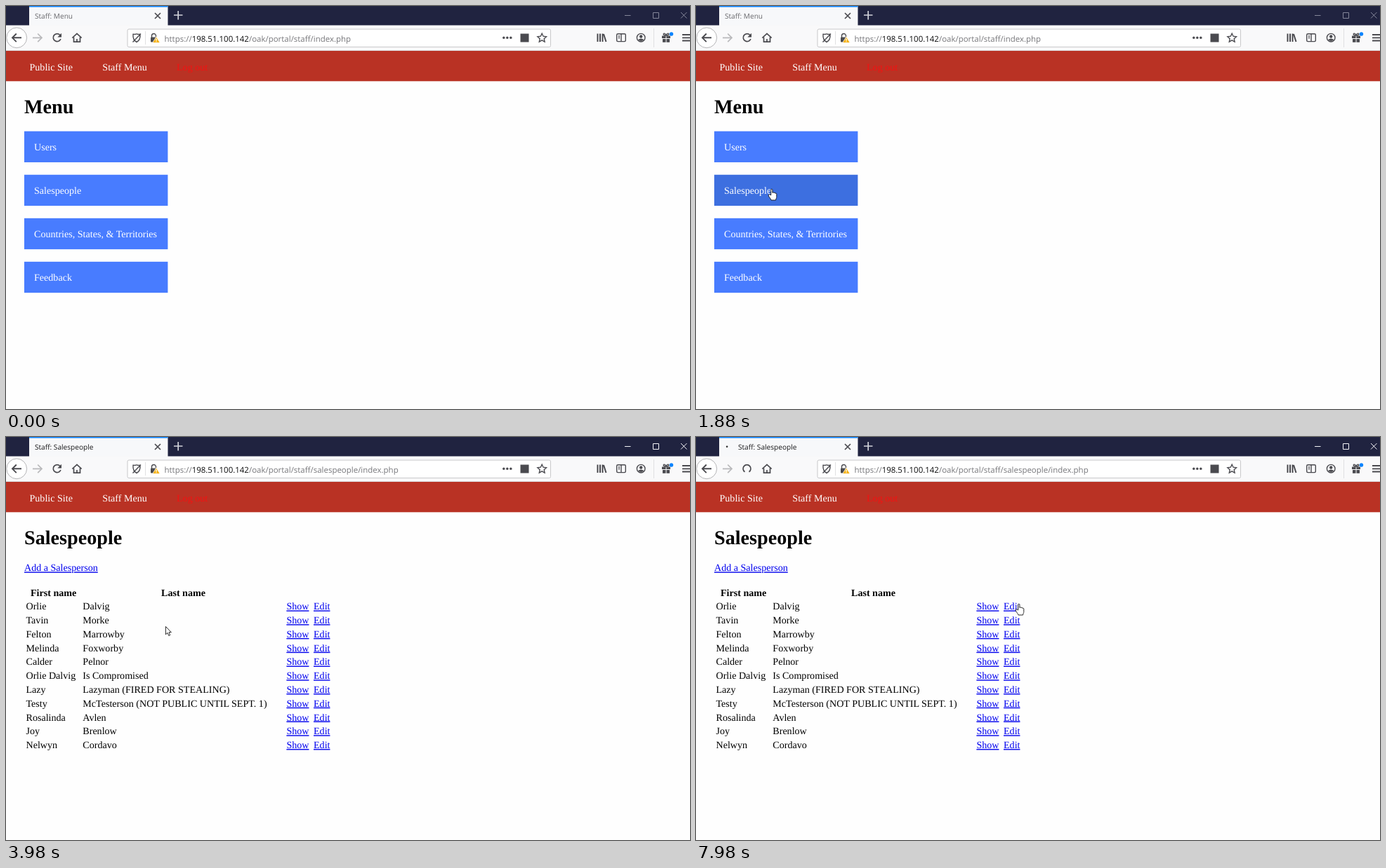
Animation, 974 px wide and 575 px high, one loop 8000 ms. Source, as an HTML page:

```html
<!DOCTYPE html>
<html lang="en">
<head>
<meta charset="utf-8">
<title>Staff</title>
<style>
  html, body { margin: 0; width: 100%; height: 100%; overflow: hidden; background: #fefefe; }
  svg { display: block; width: 974px; height: 575px; }
  text { text-rendering: geometricPrecision; white-space: pre; }
  .ui { font-family: "Open Sans", "Noto Sans", sans-serif; }
  .page { font: 14.08px "Liberation Serif", "Times New Roman", serif; }
  .h1 { font-size: 28.16px; }
  .bold { font-weight: bold; }
  .link { fill: #00e; text-decoration: underline; }
  .icon { fill: none; stroke: #4a4a4f; stroke-width: 1.7; }
  .solid { fill: #4a4a4f; stroke: none; }
</style>
</head>
<body>
<svg id="stage" viewBox="0 0 974 575">
  <rect width="974" height="575" fill="#fefefe"/>

  <!-- window frame and tab -->
  <rect width="974" height="28" fill="#202340"/>
  <rect x="33" width="197.500" height="28" fill="#f7f8fa"/>
  <rect x="33" width="197.500" height="1.500" fill="#0a84ff"/>
  <text id="title" class="ui" y="17.700" font-size="10.100"></text>
  <rect id="throbber" height="2.400" rx="1.200" fill="#333"/>
  <path class="icon" stroke-width="1.400" d="M212 10l8 8m0-8l-8 8"/>
  <path fill="none" stroke="#d2d3da" stroke-width="1.700" d="M239 13h12.500M245.200 7v12.500"/>
  <path id="controls" fill="none" d="M881 13.500h8.500M921.500 9.500h8v8h-8zM961 9l8.500 8.500m0-8.500l-8.500 8.500"/>

  <!-- toolbar -->
  <rect y="27.500" width="974" height="36.500" fill="#f9f9fa"/>
  <path stroke="#d8d8da" d="M0 63.500H974"/>
  <circle cx="15.200" cy="45.300" r="14.400" fill="#fff" stroke="#b4b4b6"/>
  <g class="icon">
    <path stroke-width="1.900" d="M9.500 45.300H22M14.800 39.500L9 45.300l5.800 5.800"/>
    <path stroke="#b9b9bb" style="stroke:#b9b9bb" d="M38 45.300H50.500M45.200 39.500L51 45.300l-5.800 5.800"/>
    <g id="reload"><path d="M76.800 41.300A5.500 5.500 0 1 0 77.900 47"/><path class="solid" d="M79 38.800v5.700h-5.700z"/></g>
    <path id="spin" d="M69.500 49.800A5.500 5.500 0 1 1 75.500 49.800"/>
    <path id="slash" d="M67 40l10.500 10.500"/>
    <path id="stop" d="M67.500 40.500l10 10m0-10l-10 10"/>
    <path d="M94.300 45.500l6.700-6.200 6.700 6.200M96.500 44.500v6.700h9v-6.700M101 51v-4"/>
  </g>
  <rect x="173" y="33" width="602.500" height="25.500" rx="2" fill="#fff" stroke="#c8c8ca"/>
  <path stroke="#e0e0e2" d="M198.500 36v19M922.500 32v27"/>
  <g class="icon" style="stroke-width:1.400">
    <path d="M181 40.300q5 .5 5-1 0 1.500 5 1c.5 6-1.500 9.500-5 11.200-3.500-1.700-5.500-5.200-5-11.200zM180.500 51.500L192 39.500"/>
    <path d="M207.500 45v-2.500a3 3 0 0 1 6 0V45"/>
    <rect class="solid" x="206" y="44.500" width="8" height="7" rx="1"/>
    <path fill="#ffbf00" style="fill:#f5b010;stroke:#fff;stroke-width:.8" d="M214 43.800l5.300 8.700h-10.600z"/>
    <path stroke="#fff" style="stroke:#fff" d="M214 46.500v3m0 .8v1"/>
    <path d="M763.200 39.200l1.900 4 4.400.5-3.300 3 .9 4.400-3.900-2.200-3.900 2.200.9-4.400-3.300-3 4.400-.5z"/>
    <path stroke-width="2" d="M842.500 39.500v11.500M846 39.500v11.500M849.500 39.500v11.500M851 40l3.500 11"/>
    <rect x="869.700" y="39.800" width="12.600" height="10.800" rx="1.500"/>
    <path d="M876 40v10.500M872 43h2m-2 2.500h2"/>
    <circle cx="904.200" cy="45.200" r="5.800"/>
    <circle class="solid" cx="904.200" cy="43.500" r="2.200"/>
    <path class="solid" d="M900 48q4.200-3 8.400 0-4.200 4-8.400 0z"/>
    <path class="solid" d="M934 42.500h5.500v3.500H934zm6.500 0h5.500v3.500h-5.500zM935 47h4.500v4.800H935zm5.500 0h4.500v4.800h-4.500z"/>
    <path d="M940 42q-5-.5-3.500-2.700 2-1 3.500 2.700 1.500-3.700 3.500-2.700Q945 41.500 940 42"/>
    <path style="stroke-width:1.800" d="M963 41h11m-11 4.300h11M963 49.500h11"/>
  </g>
  <circle cx="947.500" cy="40" r="2.700" fill="#0a84ff"/>
  <g fill="#4a4a4f">
    <circle cx="708.800" cy="45.300" r="1.700"/><circle cx="713.800" cy="45.300" r="1.700"/><circle cx="718.800" cy="45.300" r="1.700"/>
    <rect x="732.500" y="39.500" width="12" height="12"/>
  </g>
  <text class="ui" x="225.500" y="50.500" font-size="11.480" fill="#77777b">https://<tspan fill="#0c0c0d">198.51.100.142</tspan>/oak/portal/staff/<tspan id="path"></tspan></text>

  <!-- page -->
  <rect y="64" width="974" height="43.300" fill="#b93224"/>
  <g id="nav" class="page" fill="#fff"></g>
  <g id="menu" class="page"></g>
  <g id="list" class="page"></g>

  <circle id="click" r="10" fill="#ff0" fill-opacity=".47"/>
  <g id="pointer" fill="#fff" stroke="#111" stroke-width=".9" stroke-linejoin="round">
    <path id="arrow" d="M.4.4V11.800L3 9.400 4.800 13.500 6.700 12.700 5 8.700H8.300z"/>
    <path id="hand" d="M-1.300 9V1.300C-1.300-.1.900-.1.900 1.300V5.500C1.200 4.400 3 4.700 3 5.800 3.500 5 5 5.200 5 6.500 5.500 5.800 6.800 6.200 6.800 7.300V11.500C6.800 13 5.700 14 5.500 16H-1C-1.300 14-3.500 12.500-4.600 10-5.400 8.300-3.700 7.200-2.600 8.200z"/>
  </g>
</svg>
<script>
const $ = id => document.getElementById(id);

function add(parent, tag, attrs, content = '') {
  const node = document.createElementNS('http://www.w3.org/2000/svg', tag);
  for (const key in attrs) node.setAttribute(key, attrs[key]);
  node.textContent = content;
  return $(parent).appendChild(node);
}
const write = (parent, x, y, content, cls = '') => add(parent, 'text', { x, y, class: cls }, content);

write('nav', 33.5, 91.7, 'Public Site');
write('nav', 137.3, 91.7, 'Staff Menu');
write('nav', 243, 91.7, 'Log out').setAttribute('fill', '#f31212');

write('menu', 26, 153, 'Menu', 'h1 bold');
const buttons = ['Users', 'Salespeople', 'Countries, States, & Territories', 'Feedback'].map((label, i) => {
  const y = 178.7 + 62.05 * i;
  const box = add('menu', 'rect', { x: 26, y, width: 204.4, height: 44.3 });
  write('menu', 40, y + 26.8, label).setAttribute('fill', '#fff');
  return { y, box };
});

const ROW = 19.77;
const people = [
  ['Orlie', 'Dalvig'], ['Tavin', 'Morke'], ['Felton', 'Marrowby'], ['Melinda', 'Foxworby'],
  ['Calder', 'Pelnor'], ['Orlie Dalvig', 'Is Compromised'], ['Lazy', 'Lazyman (FIRED FOR STEALING)'],
  ['Testy', 'McTesterson (NOT PUBLIC UNTIL SEPT. 1)'], ['Rosalinda', 'Avlen'], ['Joy', 'Brenlow'],
  ['Nelwyn', 'Cordavo'],
];
write('list', 26, 153, 'Salespeople', 'h1 bold');
write('list', 26, 191.3, 'Add a Salesperson', 'link');
write('list', 35, 226.6, 'First name', 'bold');
write('list', 221, 226.6, 'Last name', 'bold');
people.forEach(([first, last], i) => {
  const y = 246.4 + ROW * i;
  write('list', 28.5, y, first);
  write('list', 109.3, y, last);
  write('list', 399.4, y, 'Show', 'link');
  write('list', 438, y, 'Edit', 'link');
});

// Pointer hotspot: [time, x, y], held until the next entry
const moves = [
  [130, 765, 526], [250, 610, 440], [370, 400, 345], [500, 235, 290], [620, 150, 272],
  [740, 123, 298], [870, 106, 334], [990, 98, 360], [1130, 98, 363],
  [1630, 101, 325], [1740, 107, 266], [1880, 108, 261],
  [3980, 227, 270], [4100, 345, 300], [4230, 430, 338], [4350, 449, 363], [4470, 430, 368],
  [4620, 395, 394], [4740, 358, 408], [4860, 342, 392], [4990, 355, 350], [5110, 382, 315],
  [5230, 405, 293], [5360, 413, 282], [5480, 413.5, 276], [5620, 414, 275],
  [6620, 421, 271], [6740, 438, 260], [6860, 453, 250], [6980, 460, 247], [7120, 460, 238],
];
const within = (v, from, to) => v >= from && v < to;
const show = (id, on) => { $(id).style.display = on ? '' : 'none'; };

function draw(t) {
  const onList = t >= 3110;
  const focused = t >= 2480;
  const loading = within(t, 2730, 3370) || t >= 7980;
  show('menu', !onList);
  show('list', onList);
  $('path').textContent = (onList ? 'salespeople/' : '') + 'index.php';

  $('title').textContent = 'Staff: ' + (onList ? 'Salespeople' : 'Menu');
  $('title').setAttribute('x', loading ? 60 : 41);
  $('title').setAttribute('fill', focused ? '#18181a' : '#68686c');
  $('controls').setAttribute('stroke', focused ? '#f4f4f8' : '#85879a');

  // The loading dot swings sideways and stretches at speed
  const stretched = within(t, 2870, 2990) || within(t, 3110, 3230);
  show('throbber', loading);
  $('throbber').setAttribute('x', stretched ? 49 : within(t, 2990, 3110) ? 52 : 42.8);
  $('throbber').setAttribute('y', 12.6);
  $('throbber').setAttribute('width', stretched ? 5 : 2.6);

  const spin = within(t, 2730, 2870) || t >= 7980;
  const slash = within(t, 2870, 2990);
  const stop = within(t, 2990, 3610);
  show('spin', spin);
  show('slash', slash);
  show('stop', stop);
  show('reload', !spin && !slash && !stop);

  const move = moves.filter(m => m[0] <= t).pop();
  const [, x, y] = move || [0, -99, -99];
  let over = false;
  for (const { y: top, box } of buttons) {
    const hover = !onList && within(x, 26, 230.4) && within(y, top, top + 44.3);
    box.setAttribute('fill', hover ? '#3d6fe0' : '#487cff');
    over ||= hover;
  }
  if (onList) {
    const onLink = within(x, 399, 432) || within(x, 438, 462);
    over = onLink && within(y, 234, 451) && (y - 234) % ROW < 16.5;
  }
  show('hand', over);
  show('arrow', !over);
  $('pointer').setAttribute('transform', `translate(${x} ${y})`);
  show('click', within(t, 2480, 2730) || within(t, 7730, 7980));
  $('click').setAttribute('cx', x);
  $('click').setAttribute('cy', y);
}

const start = performance.now();
function tick() {
  draw((performance.now() - start) % 8000);
  requestAnimationFrame(tick);
}
tick();
</script>
</body>
</html>
```
